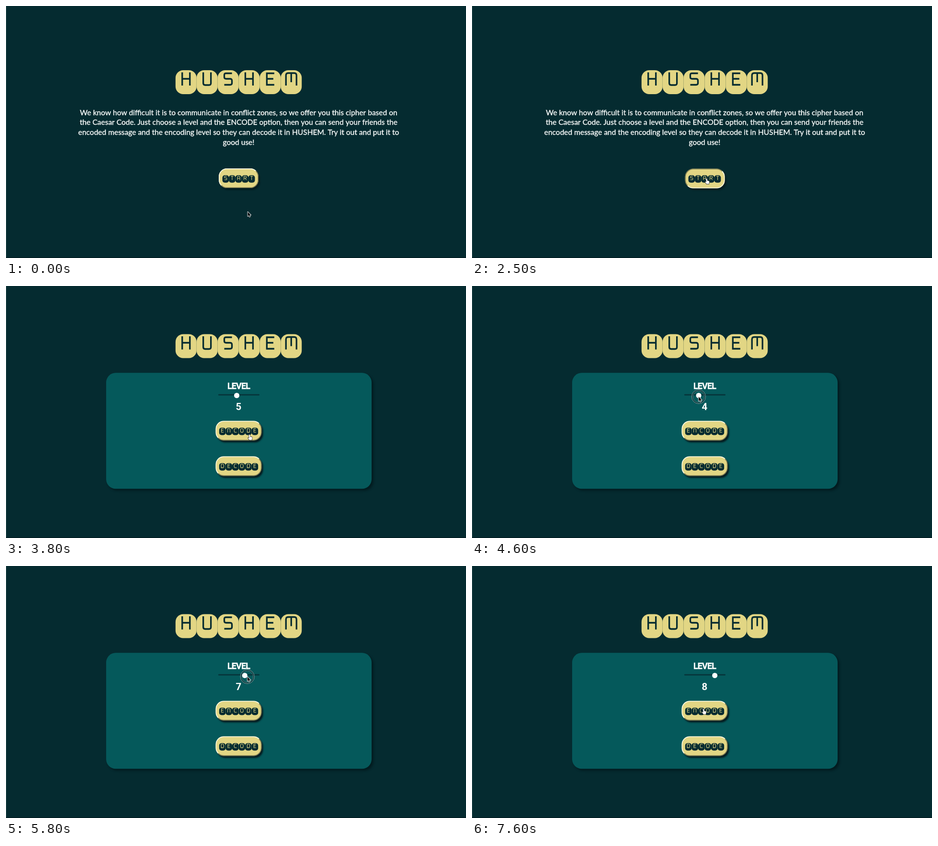
Write an HTML page with a canvas that moves like this. It is 960 px wide and 526 px high and loops after 8000 ms.

```html
<!DOCTYPE html>
<html lang="en">
<head>
<meta charset="utf-8">
<title>HUSHEM</title>
<style>
html, body { margin: 0; width: 100%; height: 100%; overflow: hidden; background: #052b30; }
canvas { display: block; width: 100vw; height: 100vh; }
</style>
</head>
<body>
<canvas id="stage" width="960" height="526" role="img" aria-label="HUSHEM cipher: START, LEVEL, ENCODE, DECODE"></canvas>
<script>
const ctx = document.getElementById('stage').getContext('2d');
const LOOP = 8000, STEP = 100, MID = 485.5;
const BG = '#052b30', SAND = '#e2d684', TEAL = '#05595b', SHADE = '#031c20', WHITE = '#fbfdfc';

const INTRO = [
  'We know how difficult it is to communicate in conflict zones, so we offer you this cipher based on',
  'the Caesar Code. Just choose a level and the ENCODE option, then you can send your friends the',
  'encoded message and the encoding level so they can decode it in HUSHEM. Try it out and put it to',
  'good use!'
];

// Tile lettering: x from the tile centre, y from the tile top
const GLYPHS = {
  A: 'M-8 32V11Q-8 6 -3 6H3Q8 6 8 11V32M-8 21H8',
  C: 'M8.5 6.5H-3Q-8 6.5 -8 11V26Q-8 30.5 -3 30.5H8.5',
  D: 'M-8 6H4Q9 6 9 11V26Q9 31 4 31H-8Z',
  E: 'M8.5 6.5H-7V30.5H8.5M-7 18H6.5',
  H: 'M-8 4.5V32M8 4.5V32M-8 18H8',
  M: 'M-11 32V11Q-11 6 -6.5 6H6.5Q11 6 11 11V32M0 6V25',
  N: 'M-8 32V6H3Q8 6 8 11V32',
  O: 'M-4 6H4Q9 6 9 11V26Q9 31 4 31H-4Q-9 31 -9 26V11Q-9 6 -4 6Z',
  R: 'M-8 32V6.5H4Q8 6.5 8 11V15Q8 19 4 19H-8M1 19L8 32',
  S: 'M8 6.5H-4Q-8 6.5 -8 10V14.5Q-8 18 -4 18H4Q8 18 8 22V27Q8 30.5 4 30.5H-8',
  T: 'M-9 6.5H9M0 6.5V32',
  U: 'M-8 4.5V27Q-8 31 -4 31H4Q8 31 8 27V4.5'
};
for (const k in GLYPHS) GLYPHS[k] = new Path2D(GLYPHS[k]);

const ARROW = new Path2D('M0 0V9.4L2.2 7.5L3.6 10.8L5.2 10.1L3.8 6.9H6.6Z');
const HAND = new Path2D('M-1.2 .8Q0 -.6 1 .8L1.6 4.4L5 5.2Q6 5.6 5.8 7L5 11.6H0L-2.8 7.6Q-3.4 6.4 -2 6.4L-.4 7.6Z');

const START = { word: 'START', x: 444, y: 339, w: 83, h: 41 };
const ENCODE = { word: 'ENCODE', x: 437.5, y: 281.5, w: 96, h: 41 };
const DECODE = { word: 'DECODE', x: 437.5, y: 355.5, w: 96, h: 41 };

// Pointer path: time, x, y
const PATH = [
  [0, 504.5, 429.5], [500, 506, 416], [900, 506, 416], [1300, 528, 394], [1600, 503, 364],
  [1700, 503, 364], [2000, 489.5, 360], [2900, 489.5, 360], [3200, 499, 380], [3800, 508, 310],
  [3900, 508, 310], [4300, 474, 231], [4400, 472, 231], [4600, 473, 231], [4800, 466, 231],
  [5000, 480, 231], [5200, 494.5, 231], [5400, 502, 231], [5500, 503, 231], [5700, 503, 231],
  [6100, 506, 231], [6300, 506, 231], [6500, 504.5, 230], [6800, 504.5, 230], [7600, 483, 298]
];

function pointer(t) {
  let i = 1;
  while (i < PATH.length - 1 && PATH[i][0] < t) i++;
  const [t0, x0, y0] = PATH[i - 1], [t1, x1, y1] = PATH[i];
  const k = Math.min(1, (t - t0) / (t1 - t0));
  return { x: x0 + (x1 - x0) * k, y: y0 + (y1 - y0) * k };
}

const INTRO_FONT = (() => {
  const face = 'px Lato, sans-serif';
  ctx.font = 100 + face;
  return (66300 / ctx.measureText(INTRO[0]).width).toFixed(2) + face;
})();
const LEVEL_FONT = 'bold 18px Roboto, sans-serif';
const DIGIT_FONT = 'bold 20.5px Roboto, sans-serif';

function box(x, y, w, h, r, fill) {
  ctx.beginPath();
  ctx.roundRect(x, y, w, h, r);
  ctx.fillStyle = fill;
  ctx.fill();
}

function shadow(blur, dx, dy) {
  ctx.shadowColor = SHADE;
  ctx.shadowBlur = blur;
  ctx.shadowOffsetX = dx;
  ctx.shadowOffsetY = dy;
}

function label(text, y, font, spacing = 0, weight = 0) {
  ctx.font = font;
  ctx.letterSpacing = spacing + 'px';
  ctx.textAlign = 'center';
  ctx.fillStyle = ctx.strokeStyle = WHITE;
  ctx.fillText(text, MID, y);
  if (weight) {
    ctx.lineWidth = weight;
    ctx.strokeText(text, MID, y);
  }
}

function tiles(word, y, scale, tile, ink) {
  const step = 43.9;
  ctx.save();
  ctx.translate(MID - word.length * step * scale / 2, y);
  ctx.scale(scale, scale);
  ctx.lineWidth = 3.3;
  ctx.strokeStyle = ink;
  [...word].forEach((ch, i) => {
    box(i * step, 0, step, 50, 16, tile);
    ctx.save();
    ctx.translate((i + .5) * step, 0);
    ctx.stroke(GLYPHS[ch]);
    ctx.restore();
  });
  ctx.restore();
}

function bevel({ x, y, w, h }, color, lit) {
  const r = 17, far = lit ? [x, y] : [x + w, y + h];
  ctx.save();
  ctx.beginPath();
  ctx.moveTo(...far);
  ctx.lineTo(x + w, y);
  ctx.lineTo(x + w - r, y + r);
  ctx.lineTo(x + r, y + h - r);
  ctx.lineTo(x, y + h);
  ctx.clip();
  ctx.beginPath();
  ctx.roundRect(x + .75, y + .75, w - 1.5, h - 1.5, r - .75);
  ctx.lineWidth = 1.5;
  ctx.strokeStyle = color;
  ctx.stroke();
  ctx.restore();
}

function button(b, down) {
  const d = down ? .6 : 0, r = { ...b, x: b.x + d, y: b.y + d };
  const light = '#fffdf0', dark = '#77754f';
  ctx.save();
  shadow(3, 3, 4);
  box(r.x, r.y, r.w, r.h, 17, SAND);
  ctx.restore();
  bevel(r, down ? dark : light, true);
  bevel(r, down ? light : dark, false);
  tiles(b.word, b.y + 14.3, .309, BG, SAND);
}

function slider(v) {
  label('LEVEL', 214.5, LEVEL_FONT, -.9, .4);
  box(443, 225.8, 86, 2.8, 1.4, '#06343a');
  ctx.beginPath();
  ctx.arc(439.5 + 8.4 * v, 228.5, 5.5, 0, 7);
  ctx.fillStyle = '#fff';
  ctx.fill();
  label(v, 258.7, DIGIT_FONT);
}

function ring(x, y) {
  const circle = (r, w, color) => {
    ctx.beginPath();
    ctx.arc(x, y, r, 0, 7);
    ctx.lineWidth = w;
    ctx.strokeStyle = color;
    ctx.stroke();
  };
  circle(13.2, 3, 'rgba(4,45,50,.75)');
  circle(14.6, .9, 'rgba(190,205,205,.75)');
  circle(12, .8, 'rgba(170,190,190,.6)');
}

function cursor(x, y, hand) {
  const shape = hand ? HAND : ARROW;
  ctx.save();
  ctx.translate(x, y);
  ctx.lineJoin = 'round';
  ctx.lineWidth = hand ? 1.2 : 1.6;
  ctx.strokeStyle = hand ? '#0b0f10' : '#fff';
  ctx.fillStyle = hand ? '#fff' : '#0b0f10';
  ctx.stroke(shape);
  ctx.fill(shape);
  ctx.restore();
}

function draw(t) {
  const p = pointer(t), intro = t < 2600;
  const over = b => p.x > b.x && p.x < b.x + b.w && p.y > b.y && p.y < b.y + b.h;
  ctx.fillStyle = BG;
  ctx.fillRect(0, 0, 960, 526);
  ctx.fillStyle = '#24474b';
  ctx.fillRect(0, 0, 1, 526);
  ctx.fillStyle = '#031d21';
  ctx.fillRect(0, 524.5, 960, 1.5);

  tiles('HUSHEM', intro ? 134 : 100.5, 1, SAND, BG);
  let hand;
  if (intro) {
    INTRO.forEach((line, i) => label(line, 227.5 + 20.7 * i, INTRO_FONT, 0, .35));
    button(START, t >= 2300);
    hand = over(START);
  } else {
    const v = t < 4400 ? 5 : t >= 6500 ? 8 : Math.round((p.x - 442) / 8.4);
    ctx.save();
    shadow(4, 4, 4);
    box(209, 181.3, 554, 242, 20, TEAL);
    ctx.restore();
    slider(v);
    button(ENCODE);
    button(DECODE);
    hand = t >= 2700 && (over(ENCODE) || over(DECODE));
    if (t >= 4400 && t < 6500) ring(p.x, p.y);
  }
  cursor(p.x, p.y, hand);
}

const began = performance.now();
function tick() {
  const t = (performance.now() - began) % LOOP;
  draw(Math.floor(t / STEP) * STEP);
  requestAnimationFrame(tick);
}
tick();
</script>
</body>
</html>
```
